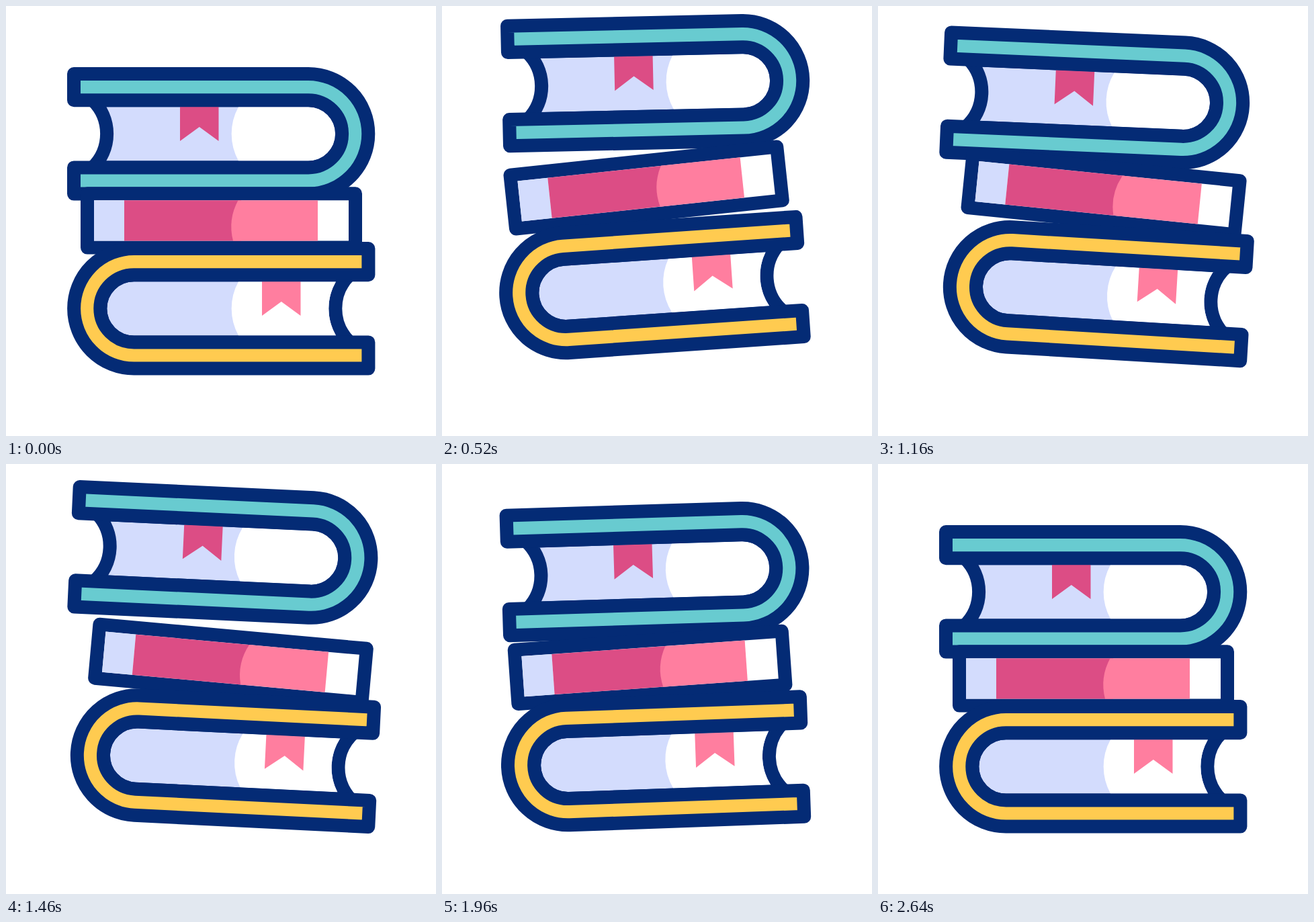
An HTML page for the animation above (3600 ms loop, 640x640 px).

```html
<!DOCTYPE html>
<html lang="en">
<head>
<meta charset="utf-8">
<title>Bouncing books</title>
<style>
  html, body { margin: 0; width: 100%; height: 100%; overflow: hidden; background: #fff; }
  svg { display: block; width: 100%; height: 100%; }
  .line { stroke: #042b75; stroke-width: 20; stroke-linejoin: round; }
</style>
</head>
<body>
<svg viewBox="0 0 640 640">
  <defs>
    <path id="pages" class="line" fill="#d3dcfd"
      d="M129 140.2A70 70 0 0 1 129 240.4H450A50.1 50.1 0 0 0 450 140.2z"/>
    <path id="cover" class="line"
      d="M101 101H450A89.3 89.3 0 0 1 450 279.6H101V240.4H450A50.1 50.1 0 0 0 450 140.2H101z"/>
    <path id="ribbon" d="M0 0H57.5V51L28.8 30L0 51z"/>
  </defs>
  <g id="top">
    <use href="#pages"/>
    <path fill="#fff" d="M346 150.2A83 83 0 0 0 346 230.4H450A40.1 40.1 0 0 0 450 150.2z"/>
    <use href="#ribbon" x="259" y="150" fill="#dc4d85"/>
    <use href="#cover" fill="#68cbd0"/>
  </g>
  <g id="middle">
    <path class="line" fill="#fff" d="M121 279.3H520V359.6H121z"/>
    <path fill="#d3dcfd" d="M131 289.3H176V349.6H131z"/>
    <path fill="#dc4d85" d="M176 289.3H350V349.6H176z"/>
    <path fill="#ff7e9f" d="M345.5 289.3A83 83 0 0 0 338 349.6H464V289.3z"/>
  </g>
  <g id="bottom">
    <use href="#pages" transform="rotate(180 320.2 320.3)"/>
    <path fill="#fff" d="M346 410.2A83 83 0 0 0 346 490.4H491A80 80 0 0 1 491 410.2z"/>
    <use href="#ribbon" x="381" y="410" fill="#ff7e9f"/>
    <use href="#cover" fill="#ffcb50" transform="rotate(180 320.2 320.3)"/>
  </g>
</svg>
<script>
const LOOP = 3600, END = 2640;

// Eases smoothly through [time, value] turning points, from rest back to rest
function track(...turns) {
  const keys = [[0, 0], ...turns, [END, 0]];
  return t => {
    const next = keys.findIndex(([time]) => time > t);
    if (next < 0) return 0;
    const [t0, v0] = keys[next - 1], [t1, v1] = keys[next];
    const u = (t - t0) / (t1 - t0);
    return v0 + (v1 - v0) * u * u * (3 - 2 * u);
  };
}

const topLift = track([360, 82], [960, 49], [1440, 57.5], [1680, 30], [1900, 34], [2200, 7]);
const topTilt = track([310, -3.8], [680, 0.4], [1350, 3], [2080, -2.1]);
const baseLift = track([400, 37], [880, 9], [1080, 26], [1500, 10], [1960, 7], [2160, 1]);
const baseTilt = track([480, -3.95], [830, -3.25], [1080, 3.5], [1440, 2.85], [1980, -2.05], [2160, 1.7]);

function pose(id, lift, tilt, pivot) {
  document.getElementById(id).setAttribute('transform',
    `translate(0 ${-lift}) rotate(${tilt} 320.3 ${pivot})`);
}

function draw() {
  const t = performance.now() % LOOP;
  const lift = baseLift(t), tilt = baseTilt(t);
  // The middle book exaggerates the rocking of the one below it
  const middleTilt = 6.2 * Math.sin(tilt * 0.35);
  pose('top', topLift(t), topTilt(t), 282);
  pose('middle', 1.1 * lift + 2.3 * Math.abs(middleTilt), middleTilt, 474);
  pose('bottom', lift, tilt, 542);
  requestAnimationFrame(draw);
}
draw();
</script>
</body>
</html>
```
